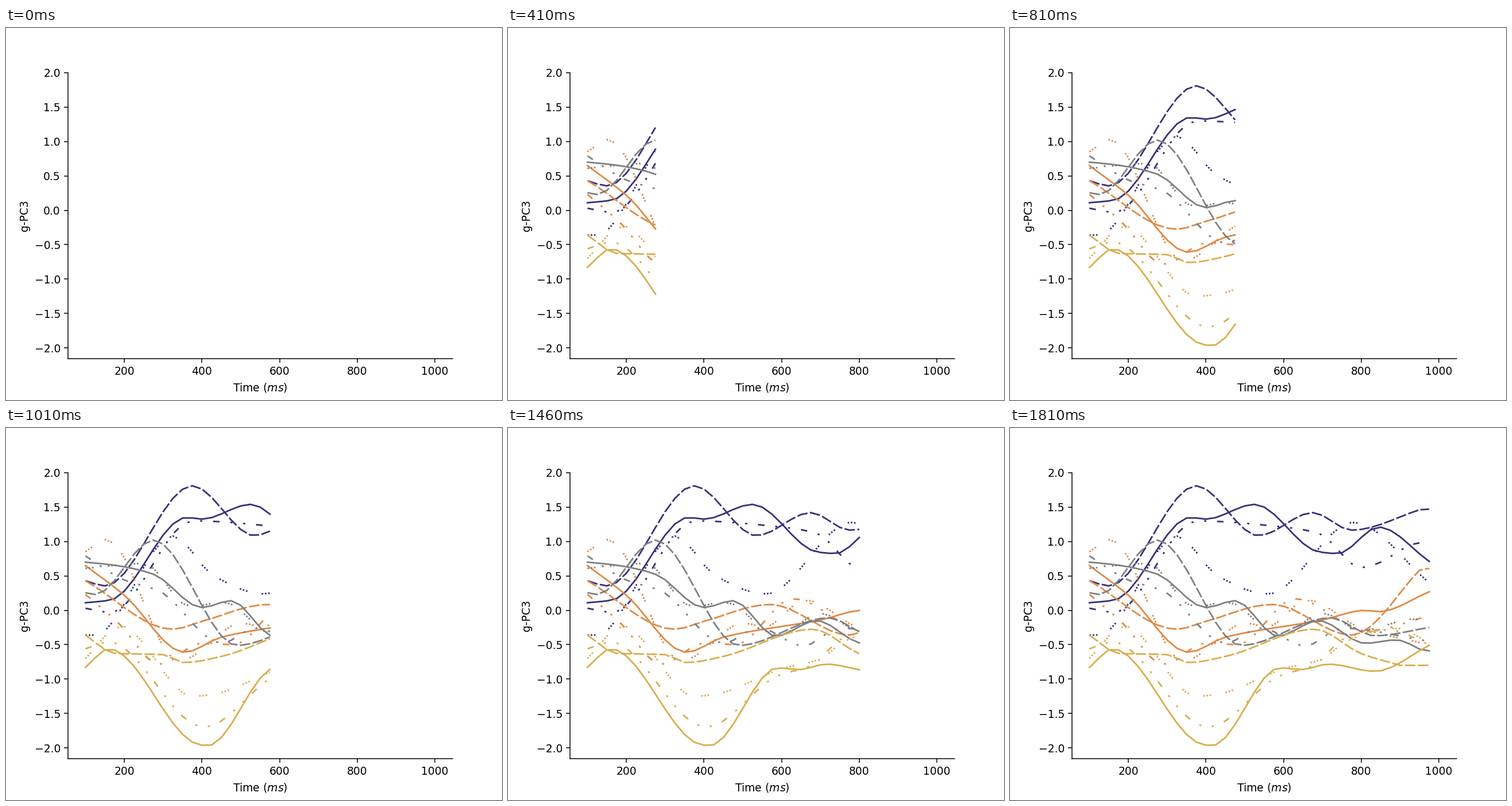
A matplotlib script that plays this animation: 864 by 648 pixels, repeating every 1.86 s.

```python
import numpy as np
import matplotlib.pyplot as plt
from matplotlib.animation import FuncAnimation

LOOP, TICK, STEP = 1860, 10, 50   # ms
NAVY, ORANGE, GRAY, GOLD = "#37327a", "#df8a47", "#808080", "#d9ae4f"
SOLID = "-"
DASH = (0, (6.5, 1.5))
DOTS = (0, (1, 1) * 2 + (1, 9))
DASHDOT = (0, (4, 6.7) + (1.3, 6.7) * 2)

plt.rcParams["font.family"] = "DejaVu Sans"
fig, ax = plt.subplots(figsize=(6.4, 4.8), dpi=135)
fig.subplots_adjust(bottom=0.1112)
ax.spines[["top", "right"]].set_visible(False)
ax.set(xlim=(55, 1045), ylim=(-2.156, 2.001), xlabel="Time ($ms$)", ylabel="g-PC3")

times = np.arange(100, 976, 25)
traces = []


def ease(t, v, x):
    """Monotone cubic through key points; flat at every peak and valley."""
    h, d = np.diff(t), np.diff(v) / np.diff(t)
    a, b = d[:-1], d[1:]
    inner = np.divide(2 * a * b, a + b, out=np.zeros_like(a), where=a * b > 0)
    m = np.concatenate([d[:1], inner, d[-1:]])
    x = np.minimum(x, t[-1])
    i = np.clip(np.searchsorted(t, x, side="right") - 1, 0, len(h) - 1)
    s = (x - t[i]) / h[i]
    return (v[i] + (v[i + 1] - v[i]) * s * s * (3 - 2 * s)
            + h[i] * s * (1 - s) * (m[i] * (1 - s) - m[i + 1] * s))


def trace(color, style, *points):
    """A line through its turning points (time, value)."""
    t, v = np.array(points, float).T
    line, = ax.plot([], [], color=color, ls=style, lw=1.5)
    traces.append((line, ease(t, v, times)))


trace(NAVY, SOLID, (100, .11), (165, .15), (360, 1.35), (400, 1.325), (525, 1.54),
      (690, .85), (740, .825), (845, 1.21), (975, .71))
trace(NAVY, DASH, (100, .43), (150, .355), (375, 1.81), (535, 1.085), (675, 1.42),
      (775, 1.165), (955, 1.47))
trace(NAVY, DOTS, (100, -.36), (125, -.36), (325, 1.08), (430, .5), (560, .235),
      (780, 1.28), (975, .4))
trace(NAVY, DASHDOT, (100, .03), (165, -.03), (375, 1.3), (600, 1.21), (690, 1.12),
      (800, .62), (935, .98))

trace(ORANGE, SOLID, (100, .65), (200, .22), (355, -.61), (450, -.39), (700, -.14),
      (810, 0), (845, -.02), (975, .27))
trace(ORANGE, DASH, (100, .43), (325, -.275), (400, -.16), (570, .085), (775, -.36),
      (955, .61))
trace(ORANGE, DOTS, (100, .85), (155, 1.03), (340, -.74), (505, -.18), (555, -.25),
      (660, .15), (800, -.26), (975, -.5))
trace(ORANGE, DASHDOT, (100, .23), (185, -.18), (290, -.79), (400, -.47), (480, -.5),
      (630, .17), (815, -.3), (975, -.08))

trace(GRAY, SOLID, (100, .7), (175, .655), (275, .525), (400, .04), (475, .14),
      (585, -.375), (690, -.15), (810, -.48), (890, -.43), (960, -.59))
trace(GRAY, DASH, (100, .255), (125, .23), (275, 1.02), (490, -.51), (720, -.11),
      (835, -.37), (975, -.25))
trace(GRAY, DOTS, (100, .61), (250, .68), (370, .05), (455, .12), (590, -.37),
      (700, -.04), (800, -.29), (915, -.13))
trace(GRAY, DASHDOT, (100, .79), (200, .44), (290, .28), (450, -.48), (540, -.25),
      (655, -.52), (750, -.26), (975, -.45))

trace(GOLD, SOLID, (100, -.83), (160, -.56), (390, -1.95), (415, -1.968), (590, -.835),
      (645, -.862), (715, -.782), (835, -.887), (975, -.51))
trace(GOLD, DASH, (100, -.36), (175, -.625), (300, -.645), (355, -.76), (450, -.67),
      (680, -.275), (800, -.63), (900, -.8))
trace(GOLD, DOTS, (100, -.7), (190, -.23), (375, -1.25), (430, -1.22), (600, -.85),
      (700, -.71), (760, -.45), (890, -.26), (975, -.47))
trace(GOLD, DASHDOT, (100, -.56), (160, -.46), (405, -1.7), (590, -.95), (675, -.81),
      (760, -.4), (870, -.28), (975, -.5))


def draw(frame):
    count = (frame * TICK - 10) // STEP
    n = count if count > 1 else 0
    for line, y in traces:
        line.set_data(times[:n], y[:n])
    return [line for line, _ in traces]


anim = FuncAnimation(fig, draw, frames=LOOP // TICK, interval=TICK,
                     init_func=lambda: draw(0), repeat=True, repeat_delay=0)
plt.show()
```
